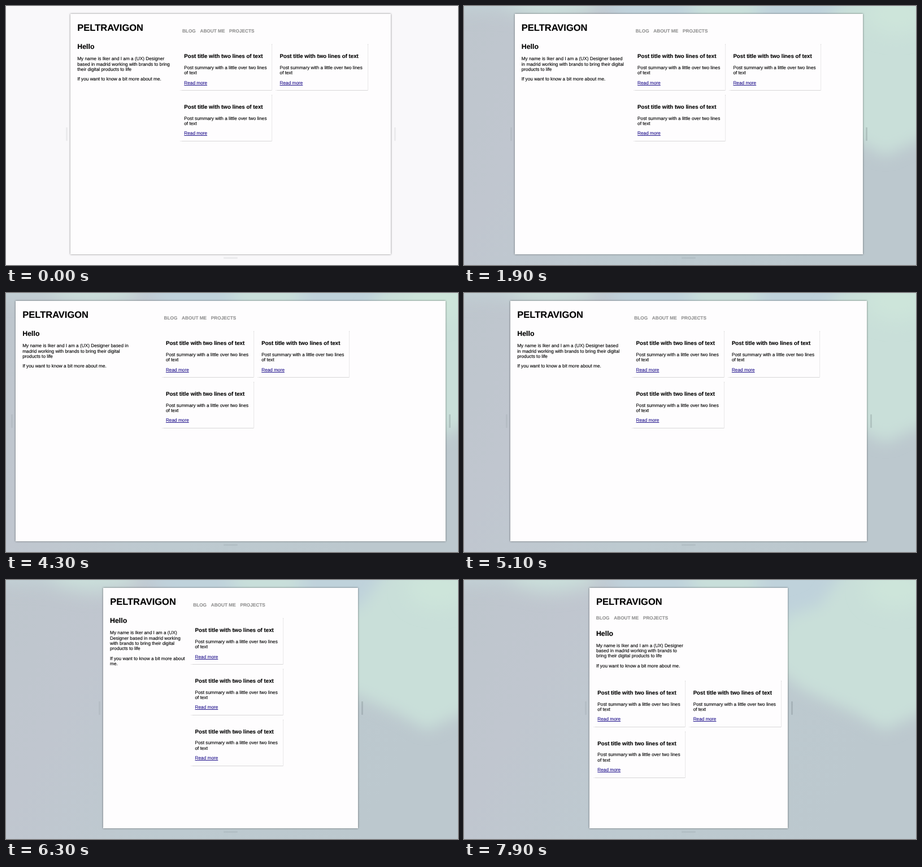
Recreate the animation shown at these times as an HTML page. Size 800 by 459 pixels, loop 8 s.

```html
<!DOCTYPE html>
<html lang="en">
<head>
<meta charset="utf-8">
<title>Responsive page</title>
<style>
  html, body { margin: 0; width: 100%; height: 100%; overflow: hidden; }
  body {
    position: relative; background: #f9f8fa; color: #000;
    font: 8.26px/9.25px "Liberation Sans", Arial, sans-serif;
    text-rendering: geometricPrecision; -webkit-text-stroke: .12px;
  }
  #backdrop { position: absolute; left: 0; top: 0; width: 800px; height: 459px; }
  #page {
    --w: 567px; --third: calc(var(--w) / 3); --drop: 0px;
    position: absolute; top: 14px; width: var(--w); height: 425.5px;
    background: #fefdfe; box-shadow: 0 0 3px rgba(0, 0, 0, .5);
  }
  #page > * { position: absolute; margin: 0; white-space: nowrap; }
  h1 { left: 12.3px; top: 16.2px; font-size: 16.5px; line-height: 19px; }
  nav {
    left: calc(var(--third) + 8.9px); top: 26.3px;
    display: flex; gap: 7.7px; color: #919191; font-weight: bold;
  }
  #page > aside {
    left: 12.2px; top: calc(50.9px + var(--drop));
    width: min(var(--third) * .887, 200px); white-space: normal;
  }
  h2 { margin: 0; font-size: 12.4px; line-height: 14px; }
  aside p { margin: 10.4px 0 -2.15px; }
  #cards {
    left: calc(var(--third) + 4px); top: 52.2px;
    display: grid; grid-template-columns: repeat(var(--cols, 2), 163.3px); gap: 6.7px 6px;
  }
  article {
    box-sizing: border-box; height: 83.1px; padding: 18.2px 8.25px 0;
    white-space: normal; box-shadow: 1px .6px 1px rgba(0, 0, 0, .15); background: #fefdfe;
  }
  h3 { margin: 0 0 9.4px; font-size: 9.72px; line-height: 11.1px; white-space: nowrap; }
  article p { margin: 0 0 8.25px; }
  article u { color: #20128c; }
  #page.narrow { --drop: 22.7px; }
  .narrow nav { left: 12px; top: 49.2px; }
  #page.narrow > aside { width: 160px; }
  .narrow #cards { left: 6.4px; top: 163px; }
  .grip { position: absolute; top: 215px; width: 3px; height: 24px; border-radius: 1px; background: rgba(60, 70, 75, .07); }
  #bottom { left: 385px; top: 445px; width: 25px; height: 2.5px; }
</style>
</head>
<body>
<svg id="backdrop" viewBox="0 0 800 459">
  <defs>
    <linearGradient id="base" x2="1" y2=".3">
      <stop stop-color="#bec6cd"/><stop offset=".25" stop-color="#c0c6cf"/>
      <stop offset=".6" stop-color="#bdcad0"/><stop offset="1" stop-color="#bcc8ce"/>
    </linearGradient>
    <filter id="soft" x="-50%" y="-100%" width="200%" height="300%"><feGaussianBlur stdDeviation="16"/></filter>
    <filter id="edge" x="-50%" y="-50%" width="200%" height="200%"><feGaussianBlur stdDeviation="13"/></filter>
  </defs>
  <rect width="800" height="459" fill="url(#base)"/>
  <g filter="url(#soft)">
    <path d="M-40-50H230V10L-40 5Z" fill="#c3d3d7"/>
    <path d="M70-50H230V10L150 22L90 10Z" fill="#cbe0db"/>
    <path d="M220-50H860V120L560 120L300 60Z" fill="#bfd2db"/>
    <path d="M390-40H520V30H410Z" fill="#c9e0da"/>
  </g>
  <path d="M690-40H860V215L800 240L745 266L690 235L600 195L530 140L570 65L630 45Z" fill="#c9dfd9" filter="url(#edge)"/>
  <ellipse cx="765" cy="15" rx="55" ry="35" fill="#cde5da" filter="url(#soft)"/>
</svg>
<div id="left" class="grip"></div>
<div id="right" class="grip"></div>
<div id="bottom" class="grip"></div>
<main id="page">
  <h1>PELTRAVIGON</h1>
  <nav><span>BLOG</span><span>ABOUT ME</span><span>PROJECTS</span></nav>
  <aside>
    <h2>Hello</h2>
    <p>My name is Iker and I am a (UX) Designer based in madrid working with brands to bring their digital products to life</p>
    <p>If you want to know a bit more about me.</p>
  </aside>
  <section id="cards"></section>
</main>
<script>
const LOOP = 8000, STEP = 100, CENTER = 397.5;
const TWO_COLUMNS = 525, NARROW = 369;

// [time in ms, left edge of the page]
const drag = [
  [0, 114], [1400, 114], [1900, 89.5], [2300, 71], [2900, 30.5], [3200, 22],
  [3900, 8], [4200, 8], [4300, 17], [5100, 82], [5700, 147], [6000, 157.5],
  [6900, 200.5], [7000, 201.8], [7800, 221.7], [LOOP, 221.7]
];

const $ = id => document.getElementById(id);
const [page, left, right, backdrop] = ["page", "left", "right", "backdrop"].map($);

$("cards").innerHTML = `<article>
  <h3>Post title with two lines of text</h3>
  <p>Post summary with a little over two lines of text</p>
  <u>Read more</u>
</article>`.repeat(3);

function edgeAt(t) {
  const i = drag.findIndex(([time]) => time > t);
  const [t0, x0] = drag[i - 1], [t1, x1] = drag[i];
  return x0 + (x1 - x0) * (t - t0) / (t1 - t0);
}

function draw(t) {
  const x = edgeAt(t), width = 2 * (CENTER - x);
  const fade = Math.min(1, Math.max(0, (t - 1000) / 300));
  page.style.left = x + "px";
  page.style.setProperty("--w", width + "px");
  page.style.setProperty("--cols", width < TWO_COLUMNS && width >= NARROW ? 1 : 2);
  page.classList.toggle("narrow", width < NARROW);
  left.style.left = x - 8 + "px";
  right.style.left = x + width + 5.5 + "px";
  right.style.background = `rgba(60, 70, 75, ${0.07 + 0.1 * fade})`;
  backdrop.style.opacity = fade;
}

const start = performance.now();
function tick() {
  const t = (performance.now() - start) % LOOP;
  draw(Math.floor(t / STEP) * STEP);
  requestAnimationFrame(tick);
}
tick();
</script>
</body>
</html>
```
